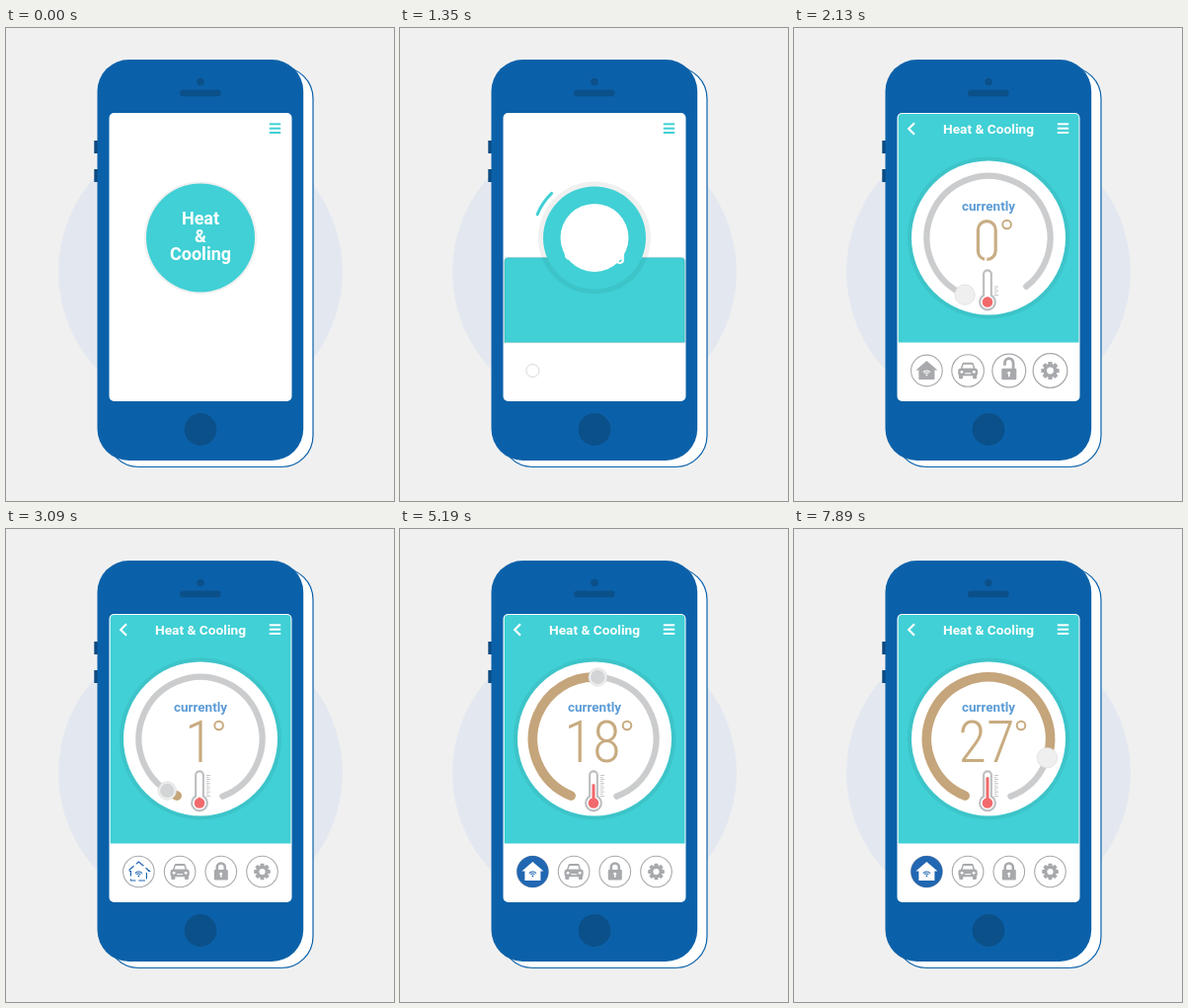
Recreate the animation shown at these times as an HTML page with a canvas. Size 393 px wide and 479 px high, loop 8 s.

```html
<!DOCTYPE html>
<html lang="en">
<head>
<meta charset="utf-8">
<title>Heat &amp; Cooling</title>
<style>
html, body { margin: 0; width: 100%; height: 100%; overflow: hidden; background: #f0f0f0; }
canvas { display: block; width: 393px; height: 479px; }
</style>
</head>
<body>
<canvas id="stage"></canvas>
<script>
const LOOP = 8000, CX = 197, CY = 212.4, TRACK = 62.5;
const BLUE = '#0b61a9', DARK = '#0b5089', TEAL = '#40d0d5', TAN = '#c5a57b';
const GRAY = '#a7a9ac', ACTIVE = '#2167b2', WHITE = '#fff';
const SANS = 'Roboto, "Open Sans", sans-serif';
const THIN = '300 condensed 59px "Roboto Condensed", Roboto, "Open Sans Condensed", "Open Sans", sans-serif';

const canvas = document.getElementById('stage');
const c = canvas.getContext('2d');
const dpr = window.devicePixelRatio || 1;
canvas.width = 393 * dpr;
canvas.height = 479 * dpr;

let t = 0;
const ramp = (a, b) => Math.min(1, Math.max(0, (t - a) / (b - a)));
const sine = x => (1 - Math.cos(Math.PI * x)) / 2;
const out = x => 1 - (1 - x) ** 3;
const back = x => 1 + 2.7 * (x - 1) ** 3 + 1.7 * (x - 1) ** 2;
const mix = (a, b, k) => a + (b - a) * k;

function paint(fill, stroke, width = 1) {
  if (fill) { c.fillStyle = fill; c.fill(); }
  if (stroke) { c.strokeStyle = stroke; c.lineWidth = width; c.stroke(); }
}
function disc(x, y, r, fill, stroke, width) {
  c.beginPath();
  c.arc(x, y, Math.max(0, r), 0, 7);
  paint(fill, stroke, width);
}
function box(x, y, w, h, r, fill, stroke, width) {
  c.beginPath();
  c.roundRect(x, y, w, h, r);
  paint(fill, stroke, width);
}
function shape(d, fill, stroke, width = 1) {
  const p = new Path2D(d);
  if (fill) { c.fillStyle = fill; c.fill(p); }
  if (stroke) { c.strokeStyle = stroke; c.lineWidth = width; c.stroke(p); }
}
function label(str, x, y, font, color) {
  c.font = font;
  c.fillStyle = color;
  c.fillText(str, x, y);
}
// Runs draw() with its own transform and opacity.
function group(x, y, scale, alpha, draw) {
  if (scale <= 0 || alpha <= 0) return;
  c.save();
  c.translate(x, y);
  c.scale(scale, scale);
  c.globalAlpha *= alpha;
  draw();
  c.restore();
}
// Arc on the dial; degrees run clockwise from the bottom.
function dialArc(from, to, color, width) {
  if (to <= from) return;
  c.beginPath();
  c.arc(CX, CY, TRACK, (from + 90) * Math.PI / 180, (to + 90) * Math.PI / 180);
  c.lineCap = 'round';
  paint(null, color, width);
  c.lineCap = 'butt';
}

function phone() {
  c.fillStyle = '#f0f0f0';
  c.fillRect(0, 0, 393, 479);
  disc(197, 247, 144, '#e3e8f0');
  box(102.5, 39.5, 208.5, 405, 32, WHITE, BLUE, 1.2);
  c.fillStyle = '#0b4a80';
  c.fillRect(89.3, 114, 5, 13);
  c.fillRect(89.3, 143, 5, 13);
  box(92.5, 32, 208.7, 406, 32, BLUE);
  disc(197, 54.5, 3.8, DARK);
  box(176, 62.5, 41.7, 6.8, 3.4, DARK);
  disc(197, 406.5, 16.4, DARK);
  box(104.5, 86, 185, 292, 5, WHITE);
}

function button(hole) {
  const halo = Math.max(57, hole + 4);
  disc(CX, CY, halo, 'rgba(0,0,0,.06)');
  disc(CX, CY, mix(55, 52, ramp(1000, 1300)), TEAL);
  ['Heat', '&', 'Cooling'].forEach((s, i) =>
    label(s, CX, 199 + 18 * i, '700 18px ' + SANS, WHITE));
  if (hole > 0) disc(CX, CY, hole, WHITE);
}

function header(top) {
  const ink = top < 101 ? WHITE : TEAL;
  c.fillStyle = ink;
  for (const y of [96.3, 100.7, 105]) c.fillRect(266.8, y, 11.4, 2);
  group(0, 0, 1, ramp(1700, 2000), () => {
    shape('M122 96.3L116.2 102L122 107.7', null, WHITE, 2.2);
    label('Heat & Cooling', 197, 107.2, '700 13.7px ' + SANS, WHITE);
  });
}

function thermometer(temp) {
  group(196, 277.5, mix(.3, 1, out(ramp(1700, 2150))), ramp(1700, 1900), () => {
    box(-4.9, -33.2, 9.8, 36, 4.9, '#bcbec0');
    disc(0, 0, 8.9, '#bcbec0');
    box(-2.8, -31.1, 5.6, 34, 2.8, WHITE);
    disc(0, 0, 6.8, WHITE);
    disc(0, 0, 5.3, '#f26a6c');
    const level = -5.2 - .79 * temp;
    box(-1.5, level, 3, -level, 1.5, '#f26a6c');
  });
  const rows = Math.round(11 * ramp(1900, 2450));
  c.fillStyle = '#b5b7b9';
  for (let i = 0; i < rows; i++) c.fillRect(203, 270 - 2.1 * i, i % 2 ? 2.6 : 4, .8);
}

function reading(temp) {
  const value = Math.floor(temp + .03);
  label('currently', CX, 185, '700 13.5px ' + SANS, `rgba(91,155,213,${ramp(1750, 2050)})`);
  if (t < 2400) {
    const drawn = sine(ramp(1750, 2180)), length = 108;
    if (drawn > 0) {
      c.setLineDash([drawn * length, 200]);
      shape('M193 234.3A8.9 8.9 0 0 1 186.4 225.5V204.5A8.9 8.9 0 0 1 204.2 204.5V225.5A8.9 8.9 0 0 1 195.3 234.4',
        null, '#c9ad85', 3.2);
      c.setLineDash([]);
    }
  } else {
    label(value, value > 9 ? 195 : 195.3, 236, THIN, '#c8ab80');
  }
  group(value > 9 ? 230 : 215.6, 199, 1, ramp(1850, 2100), () => disc(0, 0, 4.3, null, '#c8ab80', 2));
}

function dial(temp, angle) {
  dialArc(22.5, mix(22.5, 339, out(ramp(1750, 2360))), '#cbcccd', 6.2);
  if (t > 2450) dialArc(22.4, angle, TAN, 9.6);
  reading(temp);
  thermometer(temp);

  const press = ramp(2600, 2950) - ramp(6330, 6480);
  const a = angle * Math.PI / 180;
  const grow = back(ramp(1650, 2100));
  group(CX - TRACK * Math.sin(a), CY + TRACK * Math.cos(a), t < 1650 ? 0 : grow, 1, () => {
    disc(0, 0, mix(10.2, 9.2, press), '#efefef', '#dedfe0', .8);
    c.globalAlpha = press;
    disc(0, 0, 7.2, '#d3d4d5');
  });
}

function wifi(color) {
  disc(0, 4.4, .9, color);
  for (const r of [2.6, 4.6]) {
    c.beginPath();
    c.arc(0, 4.6, r, -2.45, -.69);
    paint(null, color, 1.1);
  }
}

const HOUSE = 'M0 -10L11 -.5H8V9H-8V-.5H-11Z';
function house() {
  const fade = ramp(2500, 2900), fill = out(ramp(3240, 3600));
  disc(0, 0, 16 * fill, ACTIVE);
  if (t < 2900) {
    group(0, 0, 1, 1 - fade, () => { shape(HOUSE, GRAY); wifi(WHITE); });
  } else if (fill > 0) {
    shape(HOUSE, WHITE);
  }
  if (t > 2700) {
    group(0, 0, 1, ramp(2700, 2950), () => wifi(ACTIVE));
    const part = 9.5 * ramp(2750, 3240);
    group(0, 0, 1, 1 - fill, () => {
      c.setLineDash([part, 9.5 - part]);
      shape(HOUSE, null, ACTIVE, 1.2);
      c.setLineDash([]);
    });
  }
}

function car() {
  shape('M-7.5 -1L-5.6 -6.8Q-5.2 -8 -4 -8H4Q5.2 -8 5.6 -6.8L7.5 -1Z', GRAY);
  shape('M-5.5 -2.2L-4.3 -6H4.3L5.5 -2.2Z', WHITE);
  box(-9.6, -2.2, 19.2, 7.4, 2.2, GRAY);
  box(-8.8, 3, 4, 5, 1, GRAY);
  box(4.8, 3, 4, 5, 1, GRAY);
  disc(-6, 1.3, 1.4, WHITE);
  disc(6, 1.3, 1.4, WHITE);
  c.fillStyle = WHITE;
  c.fillRect(-3, 2.2, 6, 1);
}

function lock() {
  const lift = 3 * (1 - sine(ramp(2500, 2800)));
  shape(`M-4 ${-1 - lift * 1.3}V${-4.5 - lift}A4 4 0 0 1 4 ${-4.5 - lift}V0`, null, GRAY, 2.6);
  box(-7, -2, 14, 10.6, 1, GRAY);
  disc(0, 2.2, 1.4, WHITE);
  c.fillStyle = WHITE;
  c.fillRect(-.7, 2.2, 1.4, 3.6);
}

function gear() {
  for (let i = 0; i < 8; i++) {
    c.save();
    c.rotate(i * Math.PI / 4);
    box(-1.9, -8.3, 3.8, 4, .6, GRAY);
    c.restore();
  }
  disc(0, 0, 6.4, GRAY);
  disc(0, 0, 3.1, WHITE);
}

function toolbar() {
  [house, car, lock, gear].forEach((icon, i) => {
    const start = 1260 + 110 * i;
    if (t <= start) return;
    group(134.4 + 41.7 * i, 347, back(ramp(start, start + 900)), 1, () => {
      disc(0, 0, 15.8, WHITE, GRAY, 1.1);
      group(0, 0, 1, ramp(start + 200, start + 450), icon);
    });
  });
}

function render(now) {
  t = now % LOOP;
  c.setTransform(dpr, 0, 0, dpr, 0, 0);
  c.textAlign = 'center';

  const rise = sine(ramp(2950, 4050));
  const fall = sine(ramp(4290, 5010));
  const again = sine(ramp(5190, 6480) ** 1.45);
  const temp = 25 * rise - 7 * fall + 9 * again;
  const angle = 22.5 + 253.9 * rise - 93.4 * fall + 105 * again;
  const open = sine(ramp(1100, 1700));
  const top = 319 - 232 * open;

  phone();
  if (open > 0) {
    const r = Math.min(4, 232 * open);
    box(105.7, top, 182.8, 318.6 - top, [r, r, 0, 0], TEAL, `rgba(0,0,0,${.14 * (1 - open)})`, 1.5);
  }
  // Ring sweeping round the button
  const head = 360 * sine(ramp(0, 900)), tail = 360 * sine(ramp(600, 1500));
  if (t < 1500) dialArc(136 + tail, 136 + head, TEAL, 3);
  button(78 * sine(ramp(1050, 1700)));
  header(top);
  if (t > 1650) dial(temp, angle);
  toolbar();
}

function frame() {
  render(performance.now());
  requestAnimationFrame(frame);
}
frame();
</script>
</body>
</html>
```
